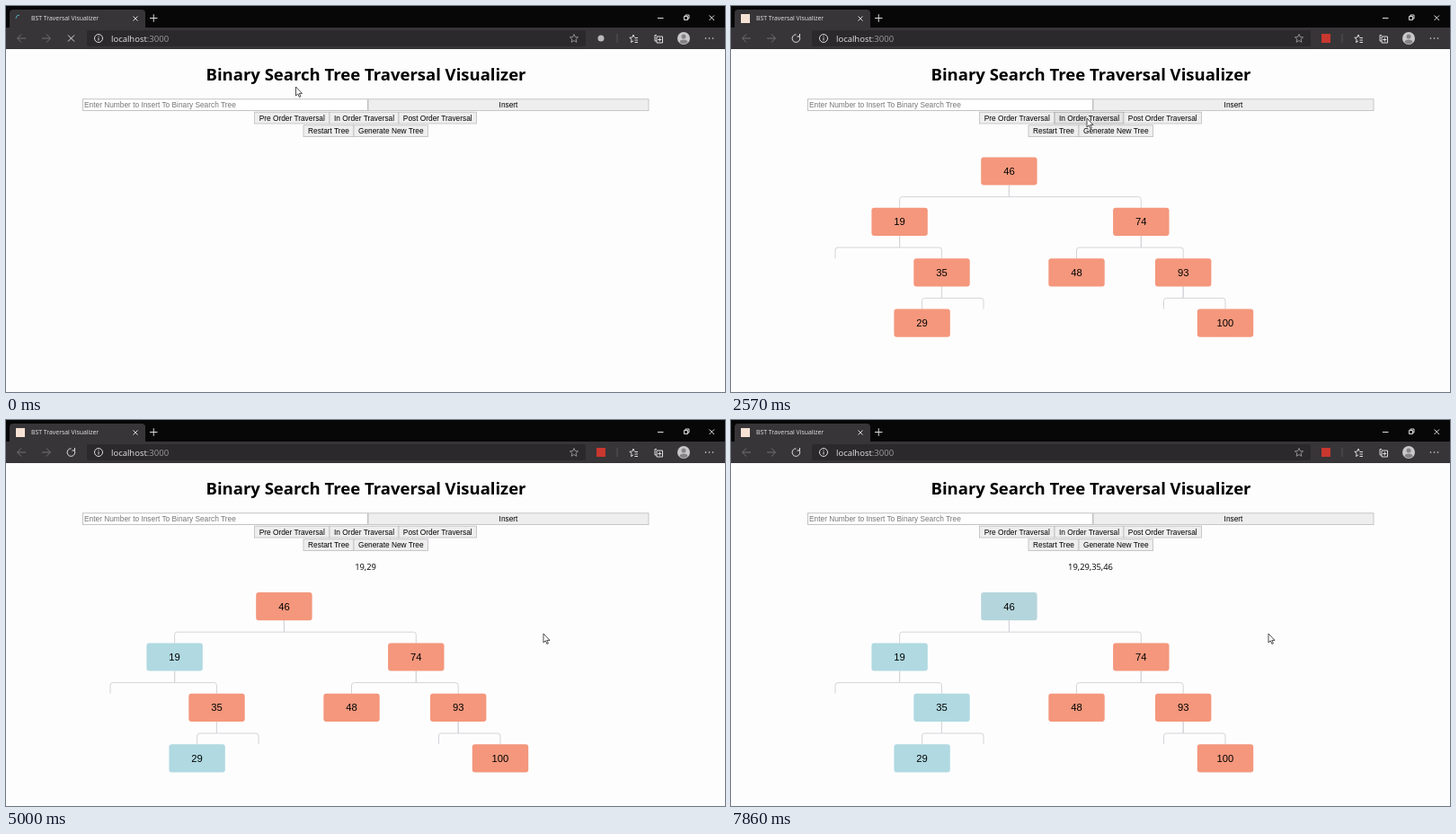
Recreate the animation shown at these times as an HTML page. Size 800x430 px, loop 8 s.

```html
<!DOCTYPE html>
<html lang="en">
<head>
<meta charset="utf-8">
<title>BST Traversal Visualizer</title>
<style>
  html, body { margin: 0; width: 100%; height: 100%; overflow: hidden; background: #fefdfe; }
  svg { display: block; width: 100%; height: 100%; }
  .ui { font-family: "Open Sans", "Noto Sans", sans-serif; }
  .form, .node { font-family: "Liberation Sans", Arial, sans-serif; }
  .form { font-size: 8.33px; }
  .node { font-size: 11.25px; }
  .middle, .form .button, .node { text-anchor: middle; }
  .icon { fill: none; stroke: #dedcde; stroke-width: 1; }
  .dim { stroke: #737173; }
  .links { fill: none; stroke: #d5d3d7; stroke-width: 1; }
</style>
</head>
<body>
<svg viewBox="0 0 800 430">
  <rect width="800" height="430" fill="#fefdfe"/>

  <!-- browser chrome -->
  <rect width="800" height="25" fill="#070707"/>
  <path d="M4 25V8q0-4 4-4H151q4 0 4 4V25z" fill="#373537"/>
  <rect y="24" width="800" height="24" fill="#373537"/>
  <rect x="90" y="27" width="555" height="18" rx="2" fill="#2b292b"/>
  <g class="ui" fill="#e6e4e6">
    <text x="28" y="16.3" font-size="6.9">BST Traversal Visualizer</text>
    <text x="117" y="39.5" font-size="9.5">localhost<tspan fill="#a19fa1">:3000</tspan></text>
  </g>
  <g class="icon">
    <path d="M141.500 11.500l5 5m0-5l-5 5M160 13.500h8.500m-4.250-4.250v8.500"/>
    <path d="M725 13.500h6.500M754.500 11.500h4v4h-4zM756 11.500v-1.500h4v4h-1.500M782.500 10.500l5.500 5.500m0-5.500l-5.500 5.500"/>
    <path class="dim" d="M22 36H13m4-4.500l-4.500 4.500 4.500 4.500M40 36h9m-4-4.500l4.500 4.500-4.500 4.500"/>
    <circle cx="103" cy="36" r="4.500"/>
    <path d="M103 35.300v3.200M103 33.300v1"/>
    <path d="M632 31.500l1.300 3 3.300.3-2.500 2.200.8 3.300-2.900-1.800-2.900 1.800.8-3.300-2.500-2.200 3.300-.3z" stroke="#a9a7a9" stroke-width=".8"/>
    <path d="M680 31v10" stroke="#575557"/>
    <path d="M698 39l-2.500 1.500.6-3.200-2.300-2 3-.3 1.200-3 1.200 2.700M699.500 35.500h3.500M699.500 38h3.500M699.500 40.500h3.500"/>
    <path d="M724 32.500h-2v6.500h2M724 34h6.500v7H724zM727.300 35.500v4M725.300 37.500h4"/>
  </g>
  <circle cx="754" cy="36" r="7" fill="#c9c7c9"/>
  <g fill="#858385"><circle cx="754" cy="34" r="2.500"/><path d="M749.500 40.500q0-3 4.500-3t4.500 3q-4.500 3.500-9 0z"/></g>
  <g fill="#dedcde"><circle cx="778.500" cy="36" r=".8"/><circle cx="782.500" cy="36" r=".8"/><circle cx="786.500" cy="36" r=".8"/></g>

  <g id="loading">
    <path id="spinner" class="icon" d="M11 14a4 4 0 0 1 4-4" style="stroke:#55a5b5"/>
    <path class="icon" d="M69 32.500l7 7m0-7l-7 7"/>
    <circle cx="662" cy="36" r="3.500" fill="#bab8ba"/>
  </g>
  <g id="loaded">
    <rect x="11" y="9" width="10" height="10" fill="#f6e2d5"/>
    <path class="icon" d="M75.800 33.500a4.300 4.300 0 1 1-3.300-1.700M76.500 31v3h-3"/>
    <rect x="657" y="31" width="10" height="10" fill="#c9372f"/>
  </g>

  <!-- page -->
  <text class="ui middle" x="400.500" y="83" font-size="18.500" font-weight="700">Binary Search Tree Traversal Visualizer</text>
  <g id="form" class="form">
    <rect x="85.500" y="103.800" width="317" height="12.700" fill="#fff" stroke="#b5b3b5" stroke-width=".8"/>
    <text x="87" y="113" fill="#757575">Enter Number to Insert To Binary Search Tree</text>
  </g>
  <text id="visited" class="ui middle" x="400" y="166.700" font-size="9.400"></text>
  <g id="tree"></g>
  <path id="cursor" d="M0 0V10l2.300-2.100 1.600 3.600 1.500-.7-1.600-3.400H7z" fill="#fff" stroke="#222" stroke-width=".8"/>
</svg>

<script>
const LOOP = 8000, STEP = 1000 / 7;
const LOADED_AT = 430, TREE_AT = 1290;
const VISIT_AT = 2930, VISIT_EVERY = 1525, FADE = 460;
const PRESSES = [1140, 2855], PRESS_LENGTH = 140;
const SALMON = [244, 151, 124], BLUE = [176, 217, 225];
const HALF_W = 31.2, HALF_H = 15.6, LEVEL = 56.4, ROOT_Y = 184;
const visitOrder = [19, 29, 35, 46];

const cursorPath = [
  [0, 322.5, 90], [860, 404, 138], [1860, 404, 138], [2140, 408, 149], [2570, 396, 125],
  [3000, 396, 125], [3860, 504, 198], [4000, 522, 209], [4145, 522, 209], [4860, 598, 238]
];

// A node without a value is an empty branch.
const root = {
  value: 46, x: 309.4, children: [
    { value: 19, x: 187.6, children: [
      { x: 116 },
      { value: 35, x: 234.5, children: [{ value: 29, x: 212.6 }, { x: 281 }] }
    ] },
    { value: 74, x: 456.3, children: [
      { value: 48, x: 384.5 },
      { value: 93, x: 503.2, children: [{ x: 481.5 }, { value: 100, x: 550 }] }
    ] }
  ]
};

const byId = id => document.getElementById(id);
const show = (id, on) => byId(id).setAttribute("visibility", on ? "visible" : "hidden");

function add(parent, tag, attributes, text = "") {
  const el = document.createElementNS("http://www.w3.org/2000/svg", tag);
  for (const name in attributes) el.setAttribute(name, attributes[name]);
  el.textContent = text;
  return parent.appendChild(el);
}

const buttons = [
  ["Insert", 403, 715, 103.8], ["Pre Order Traversal", 276.5, 360, 118.2],
  ["In Order Traversal", 360, 437, 118.2], ["Post Order Traversal", 437, 523.5, 118.2],
  ["Restart Tree", 331, 387, 132.8], ["Generate New Tree", 387, 469.5, 132.8]
].map(([label, left, right, top]) => {
  const rect = add(byId("form"), "rect", { x: left, y: top, width: right - left, height: 12.8, "stroke-width": 0.8 });
  add(byId("form"), "text", { class: "button", x: (left + right) / 2, y: top + 9.3 }, label);
  return { rect, left, right, top };
});

const boxes = {};
function drawNode({ value, x, children = [] }, y) {
  const tree = byId("tree"), bend = y + HALF_H + 13, r = 3;
  for (const child of children) {
    const side = Math.sign(child.x - x);
    add(tree, "path", {
      class: "links",
      d: `M${x} ${y + HALF_H}V${bend}H${child.x - side * r}Q${child.x} ${bend} ${child.x} ${bend + r}V${y + LEVEL - HALF_H}`
    });
    drawNode(child, y + LEVEL);
  }
  if (!value) return;
  boxes[value] = add(tree, "rect", {
    x: x - HALF_W, y: y - HALF_H, width: 2 * HALF_W, height: 2 * HALF_H, rx: 3, fill: `rgb(${SALMON})`
  });
  add(tree, "text", { class: "node", x, y: y + 4 }, value);
}
drawNode(root, ROOT_Y);

function cursorAt(t) {
  const next = cursorPath.findIndex(key => key[0] > t);
  if (next < 0) return cursorPath.at(-1).slice(1);
  const [t0, x0, y0] = cursorPath[next - 1], [t1, x1, y1] = cursorPath[next];
  const k = (t - t0) / (t1 - t0);
  return [x0 + (x1 - x0) * k, y0 + (y1 - y0) * k];
}

function render(t) {
  const [cx, cy] = cursorAt(t);
  byId("cursor").setAttribute("transform", `translate(${cx} ${cy})`);

  show("loading", t < LOADED_AT);
  show("loaded", t >= LOADED_AT);
  byId("spinner").setAttribute("transform", `rotate(${t * 0.4} 15 14)`);

  const pressed = PRESSES.some(p => t >= p && t < p + PRESS_LENGTH);
  for (const { rect, left, right, top } of buttons) {
    const hover = cx >= left && cx < right && cy >= top && cy < top + 12.8;
    rect.setAttribute("fill", !hover ? "#efeeef" : pressed ? "#f5f5f5" : "#e4e3e4");
    rect.setAttribute("stroke", hover ? "#a3a1a3" : "#bdbbbd");
  }

  show("tree", t >= TREE_AT - 5);
  byId("tree").setAttribute("transform", `translate(0 ${t >= VISIT_AT ? 23.6 : 0})`);
  const visited = visitOrder.filter((value, i) => {
    const progress = Math.min(1, Math.max(0, (t - VISIT_AT - i * VISIT_EVERY) / FADE));
    const k = 1 - (1 - progress) ** 2;
    boxes[value].setAttribute("fill", `rgb(${SALMON.map((c, j) => Math.round(c + (BLUE[j] - c) * k))})`);
    return progress > 0;
  });
  byId("visited").textContent = visited.join(",");
}

function frame() {
  const t = performance.now() % LOOP;
  render(Math.floor((t + 5) / STEP) * STEP % LOOP);
  requestAnimationFrame(frame);
}
frame();
</script>
</body>
</html>
```
